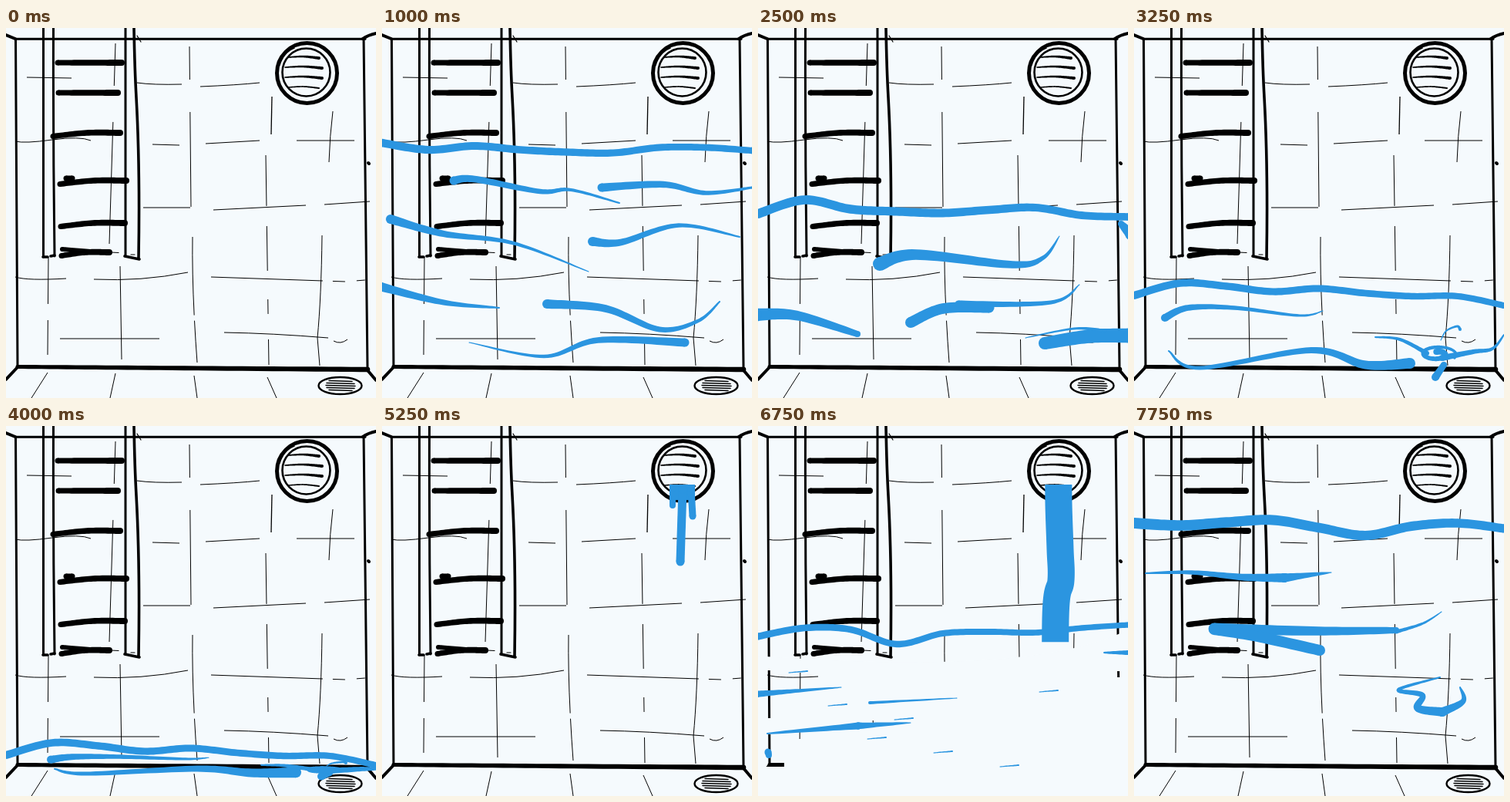
Recreate the animation shown at these times as an HTML page with a canvas. Size 480 by 480 pixels, loop 8 s.

```html
<!DOCTYPE html>
<html lang="en">
<head>
<meta charset="utf-8">
<title>Pool</title>
<style>
  html, body { margin: 0; width: 100%; height: 100%; overflow: hidden; background: #f5fafd; }
  canvas { display: block; width: 100%; height: 100%; }
</style>
</head>
<body>
<canvas id="pool" width="480" height="480"></canvas>
<script>
const ctx = document.getElementById('pool').getContext('2d');
const PAPER = '#f5fafd', INK = '#000', WATER = '#2b95e0';
const SIZE = 480, STEP = 250, COUNT = 32, FLOOR = 455;

const mix = (a, b, u) => a + (b - a) * u;
const pairs = a => a.flatMap((v, i) => i % 2 ? [] : [[v, a[i + 1]]]);
const times = (n, make) => Array.from({ length: n }, (_, i) => make(i));

// Catmull-Rom curve through a few points
function smooth(pts) {
  const out = [];
  for (let i = 0; i < pts.length - 1; i++) {
    const b = pts[i], c = pts[i + 1], a = pts[i - 1] || b, d = pts[i + 2] || c;
    for (let u = 0; u < 1; u += 1 / 16) {
      out.push([0, 1].map(n => b[n] + 0.5 * ((c[n] - a[n]) * u
        + (2 * a[n] - 5 * b[n] + 4 * c[n] - d[n]) * u ** 2
        + (3 * b[n] - a[n] - 3 * c[n] + d[n]) * u ** 3)));
    }
  }
  return [...out, pts[pts.length - 1]];
}

// Round-ended stroke whose width runs from w0 to w1
function brush(color, w0, w1, pts) {
  const line = smooth(pts), last = line.length - 1, left = [], right = [];
  line.forEach(([x, y], i) => {
    const p = line[Math.max(0, i - 1)], q = line[Math.min(last, i + 1)];
    const dx = q[0] - p[0], dy = q[1] - p[1];
    const k = mix(w0, w1, i / last) / 2 / (Math.hypot(dx, dy) || 1);
    left.push([x - dy * k, y + dx * k]);
    right.unshift([x + dy * k, y - dx * k]);
  });
  ctx.fillStyle = color;
  ctx.beginPath();
  left.concat(right).forEach(p => ctx.lineTo(...p));
  ctx.fill();
  for (const [p, w] of [[line[0], w0], [line[last], w1]]) {
    ctx.beginPath();
    ctx.arc(...p, w / 2, 0, 7);
    ctx.fill();
  }
}

function pen(width, path, dash = []) {
  ctx.strokeStyle = INK;
  ctx.lineWidth = width;
  ctx.setLineDash(dash);
  ctx.stroke(new Path2D(path));
}

function ring(x, y, rx, ry, width) {
  ctx.strokeStyle = INK;
  ctx.lineWidth = width;
  ctx.setLineDash([]);
  ctx.beginPath();
  ctx.ellipse(x, y, rx, ry, 0, 0, 7);
  ctx.stroke();
}

function drawTiles() {
  ctx.lineCap = 'butt';
  // columns, left to right
  pen(1, 'M55 297L54 424', [61, 21, 45, 99]);
  pen(1, 'M142 20L134 280', [55, 47, 160]);
  pen(1, 'M148 309L150 430');
  pen(1, 'M238 24L240 232', [43, 42, 123]);
  pen(1, 'M242 271Q241 340 248 434', [102, 7, 60]);
  pen(1.3, 'M345 89L344 138');
  pen(1, 'M337 165L341 437', [66, 26, 58, 37, 19, 33, 33]);
  pen(1, 'M424 108Q420 140 419 174M410 269Q409 350 404 402L407 438');
  // rows, top to bottom
  pen(1, 'M27 64L85 65M170 71Q190 74 228 73M252 76Q300 74 329 71');
  pen(1, 'M12 147Q24 150 60 145T110 146M190 151L225 152M259 150L329 146M377 146L452 146');
  pen(1, 'M178 233H239M269 236L389 230M413 229L472 225');
  pen(1, 'M12 323Q28 328 78 325M114 326Q175 329 236 317');
  pen(1, 'M266 323L440 329L466 327', [145, 13, 16, 15, 11]);
  pen(1, 'M70 403H199M283 395Q345 396 418 402M425 406Q434 411 443 404');
  // floor
  pen(1, 'M54 447L33 480M142 448L135 480M244 451L248 480M339 453L351 480');
}

function drawLadder() {
  pen(3, 'M48.500 0V297M61.500 0Q61 150 63 296M155 0V296');
  pen(3.6, 'M166 0Q167 55 169 90Q174 180 172 299M154 296L173 300M48 297H54M58 296L63 295');
  const rungs = [[67, 45, 150], [68, 84, 145], [61, 139, 148], [70, 201, 156], [71, 256, 154], [72, 294, 134]];
  rungs.forEach(([x0, y, x1], i) => {
    const bow = i < 2 ? 0 : 3;
    brush(INK, 7, 8, [[x0, y + bow / 2], [mix(x0, x1, 0.5), y - bow], [x1, y - bow]]);
  });
  brush(INK, 7, 7, [[78, 195], [86, 195]]);
  brush(INK, 6, 5, [[73, 287], [115, 290]]);
  pen(1.2, 'M136 291L146 291.500M162 294H167M170 10L175 18');
}

function drawRoom() {
  drawTiles();
  ctx.lineCap = 'round';
  pen(3, 'M12 14.300H466M12.500 14L15 440M464 14L469 444');
  pen(4, 'M0 9L12 14M463 14Q470 9 480 7M0 456L15 440M469 444L480 457');
  brush(INK, 5, 6.5, [[15, 439.5], [200, 441], [469, 443]]);
  drawLadder();
  // vent
  ring(390.5, 58.5, 39, 39, 5);
  ring(389.5, 57.5, 31, 31, 2.6);
  pen(1.5, 'M355 48Q360 31 374 26');
  for (let i = 0; i < 4; i++) {
    const y = 38 + 13 * i, half = i % 3 ? 24 : 20;
    brush(INK, 1.5, i < 3 ? 4 : 2, [[386 - half, y], [386, y - 1], [386 + half, y + 1]]);
  }
  // drain
  ring(433.5, 464, 28, 11, 2.4);
  for (let i = -2; i <= 2; i++)
    pen(1.5, `M${415 + i * i} ${463.5 + i * 3}L${453 - i * i} ${464.5 + i * 3}`);
  pen(4, 'M470 175L471 176');
}

// Key looks of the water: surface heights at even steps across the stage,
// and strokes below it as [first width, last width, x, y, x, y, ...]
const high = {
  key: 4, from: 1, to: 7, width: 10.5,
  top: [149, 158, 153, 158, 161, 162, 155, 155, 159],
  strokes: [
    [11, 2, 93, 198, 120, 196, 205, 212, 245, 210, 308, 227],
    [11, 3, 285, 207, 365, 203, 420, 214, 480, 207],
    [12, 1, 11, 248, 80, 267, 170, 279, 268, 316],
    [12, 2, 273, 277, 310, 278, 385, 256, 464, 271],
    [12, 2, -4, 335, 80, 356, 152, 363],
    [12, 2, 214, 358, 290, 364, 360, 391, 410, 380, 438, 355],
    [1, 11, 113, 408, 210, 426, 280, 405, 393, 408]]
};
const middle = {
  key: 10, from: 8, to: 11, width: 12,
  top: [241, 223, 235, 238, 240, 236, 233, 243, 245],
  strokes: [
    [18, 1, 158, 306, 205, 294, 330, 307, 370, 298, 391, 270],
    [14, 13, 198, 382, 240, 364, 300, 363],
    [9, 1, 260, 358, 380, 356, 417, 333],
    [17, 8, -4, 372, 50, 373, 129, 397],
    [16, 19, 372, 409, 430, 400, 484, 399],
    [1, 5, 347, 402, 410, 390, 450, 393],
    [8, 15, 471, 254, 484, 268]]
};
const low = {
  key: 13, from: 12, to: 16, width: 10,
  top: [347, 331, 335, 342, 338, 344, 348, 348, 360],
  strokes: [
    [10, 1, 40, 376, 70, 363, 130, 363, 215, 373, 245, 367],
    [2, 14, 45, 419, 85, 441, 230, 418, 300, 437, 358, 435],
    [2, 6, 313, 401, 345, 404, 380, 422],
    [8, 2, 400, 428, 440, 420, 465, 416, 480, 398],
    [8, 10, 402, 437, 391, 453],
    [1, 4, 398, 405, 405, 393, 419, 387, 423, 391],
    // whirl over the drain
    [3, 8, ...times(14, i => {
      const a = i * 0.65 - 0.5, r = 1 - i / 18;
      return [393 + 26 * r * Math.cos(a), 423 - 11 * r * Math.sin(a)];
    }).flat()]]
};
const rising = {
  key: 27, from: 23, to: 28, width: 9,
  top: [273, 262, 264, 283, 269, 267, 268, 262, 258],
  strokes: [
    [9, 1, -4, 348, 45, 344, 108, 339],
    [4, 1, 145, 359, 258, 353],
    [2, 9, 12, 399, 130, 389],
    [9, 1, 130, 389, 198, 385],
    [2, 7, 449, 294, 484, 294],
    [9, 8, 13, 423, 14, 427],
    // stray slivers
    ...times(7, i => {
      const x = 40 + i * 137 % 360, y = 320 + i * 61 % 140;
      return [1, 2, x, y, x + 24, y - 2];
    })]
};
const full = {
  key: 31, from: 29, to: 31, width: 14,
  top: [126, 129, 125, 122, 132, 142, 130, 126, 133],
  strokes: [
    [2, 12, 15, 191, 75, 190, 140, 196, 195, 197],
    [12, 1, 195, 197, 256, 190],
    [15, 8, 104, 263, 240, 266, 340, 265],
    [5, 1, 340, 267, 375, 256, 399, 241],
    [14, 14, 104, 264, 160, 273, 241, 291],
    [2, 12, 397, 326, 343, 342, 374, 349, 368, 366, 400, 371],
    [12, 2, 400, 371, 427, 357, 423, 339]]
};
const looks = [high, middle, low, rising, full];

const moved = (look, key, dy) => ({ ...look, key, top: look.top.map(y => y + dy) });
const mean = a => a.reduce((sum, y) => sum + y, 0) / a.length;

// [start, end, easing power]
const spans = [
  [moved(high, 1, -30), high, 1], [high, middle, 1.8], [middle, low, 1],
  [low, moved(low, 16, 80), 1.7], [moved(rising, 23, 195), rising, 1], [rising, full, 0.6]
];

function surfaceAt(k) {
  const span = spans.find(([a, b]) => k >= a.key && k <= b.key);
  if (!span) return null;
  const [a, b, power] = span;
  const u = (k - a.key) / (b.key - a.key), e = u ** power;
  const top = a.top.map((y, i) =>
    mix(y, b.top[i], e) + 16 * u * (1 - u) * Math.sin(i * 1.2 + k * 2));
  return { top, width: mix(a.width, b.width, e), level: mean(top) };
}

// Strokes drift sideways and stay between the surface and the floor
function drawStrokes(k, level) {
  const look = looks.find(l => k >= l.from && k <= l.to);
  const base = mean(look.top), squash = (FLOOR - level) / (FLOOR - base);
  const drift = (k - look.key) * 6;
  for (const [w0, w1, ...xy] of look.strokes)
    brush(WATER, w0, w1, pairs(xy).map(([x, y]) => [x + drift, level + (y - base) * squash]));
}

// The rising water wipes the room but misses a few scraps of line
function wipe(level) {
  const scraps = [[10, 317, 8, 62], [10, 400, 24, 42], [18, 320, 60, 9], [50, 329, 8, 16],
    [50, 394, 8, 12], [144, 382, 8, 6], [463, 318, 10, 8]];
  ctx.fillStyle = PAPER;
  ctx.beginPath();
  ctx.moveTo(0, level + 31);
  ctx.quadraticCurveTo(360, level + 58, SIZE, level - 3);
  ctx.lineTo(SIZE, SIZE);
  ctx.lineTo(0, SIZE);
  scraps.filter(s => s[1] > level + 48).forEach(s => ctx.rect(...s));
  ctx.fill('evenodd');
}

function drawDrips(grow) {
  const drop = (x0, x1, end, w) => brush(WATER, w, w, [[x0, 82], [x1, mix(82, end, grow)]]);
  ctx.fillStyle = WATER;
  ctx.fillRect(373, 76, 33, 20 * grow);
  drop(377, 377, 103, 8);
  drop(390, 387, 176, 11);
  drop(401, 403, 117, 9);
}

function drawStream(end) {
  ctx.save();
  ctx.beginPath();
  ctx.rect(0, 76, SIZE, end - 76);
  ctx.clip();
  brush(WATER, 35, 35, pairs([390, 50, 390, 100, 392, 160, 393, 200, 386, 250, 387, SIZE]));
  ctx.restore();
}

function drawFrame(k) {
  ctx.fillStyle = PAPER;
  ctx.fillRect(0, 0, SIZE, SIZE);
  drawRoom();
  if (k >= 19 && k <= 21) drawDrips(((k - 18) / 3) ** 1.3);
  if (k === 22) drawStream(340);
  const water = surfaceAt(k);
  if (!water) return;
  const filling = k >= rising.from && k <= rising.to;
  if (filling) wipe(water.level);
  drawStrokes(k, water.level);
  brush(WATER, water.width, water.width * 0.8, water.top.map((y, i) => [i * 60, y]));
  if (filling) drawStream(water.level + 13);
}

const start = performance.now();
let shown = -1;
function tick() {
  const k = Math.floor((performance.now() - start) / STEP) % COUNT;
  if (k !== shown) drawFrame(shown = k);
  requestAnimationFrame(tick);
}
tick();
</script>
</body>
</html>
```
